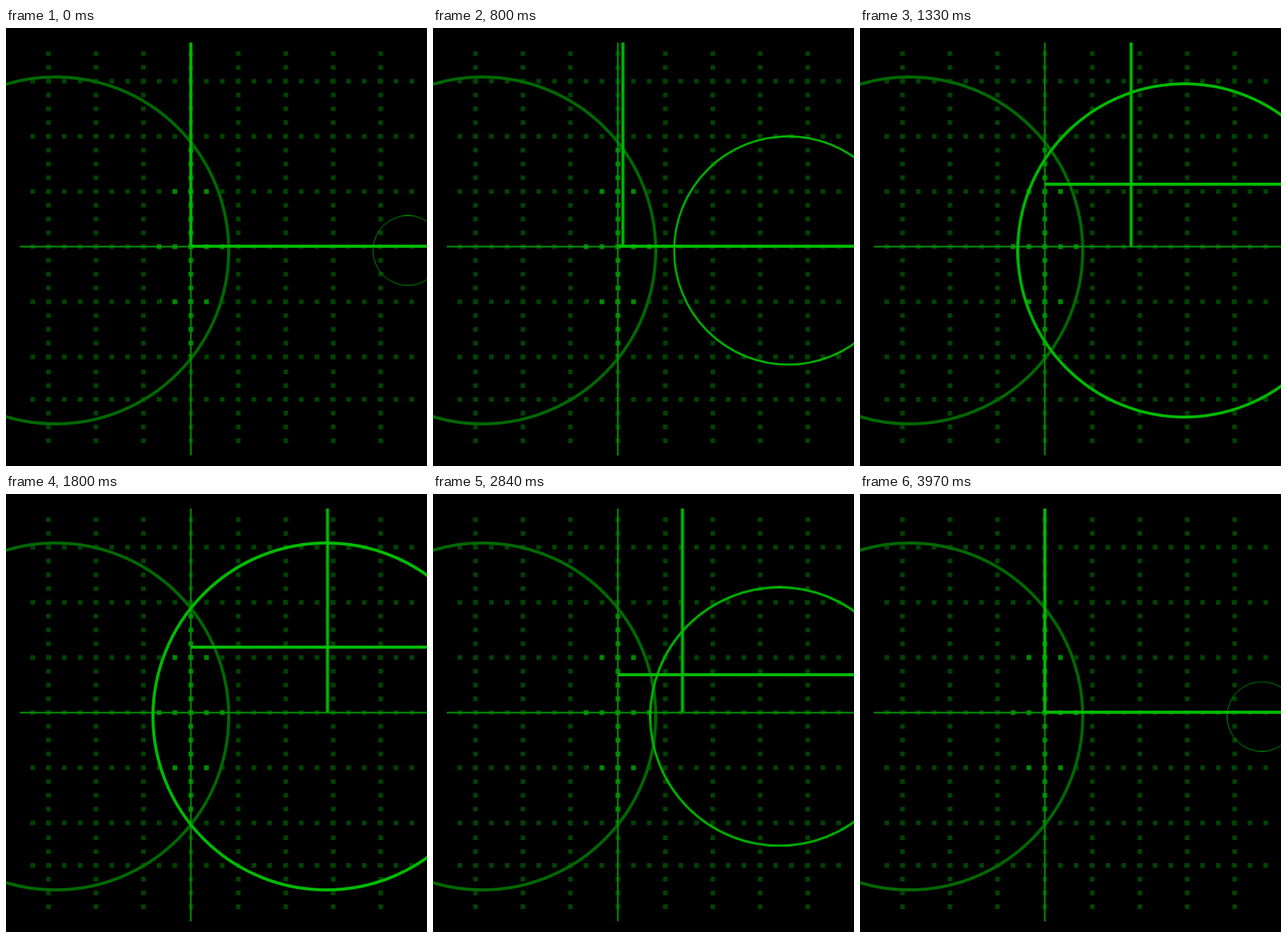
Animation of 550 by 572 pixels, one loop 4000 ms. Source, as an HTML page without scripts:

```html
<!DOCTYPE html>
<html lang="en">
<head>
<meta charset="utf-8">
<title>Grid and circles</title>
<style>
  html, body { margin: 0; width: 100%; height: 100%; overflow: hidden; background: #000; }
  svg { display: block; width: 550px; height: 572px; }
  path, circle { fill: none; }
  .dots { stroke: #004300; }
  .lit { stroke: #008a00; }
  .dots path, .lit path { stroke-width: 6; }
  .rows { stroke-dasharray: 6 14.625; }
  .cols { stroke-dasharray: 6 12; }
  .axes { stroke: #009800; stroke-width: 2; }
  .still { stroke: #006800; stroke-width: 4; }
  .moving { stroke: #00ba00; stroke-width: 4; }
  .moving > * { animation: 4s linear infinite; }
  .moving .disc { animation-name: grow; transform-origin: 551.8px 290.5px; }
  .moving .up { animation-name: slide; }
  .moving .across { animation-name: lift; }

  @keyframes grow {
    0%, 79.6%, 100% { transform: scale(.201); }
    35%, 67% { transform: scale(1); }
  }
  @keyframes slide {
    0%, 19.2%, 79.6%, 100% { transform: translateX(0); }
    43% { transform: translateX(190.5px); }
    54.25%, 67% { transform: translateX(124px); }
  }
  @keyframes lift {
    0%, 21.5%, 79.6%, 100% { transform: translateY(0); }
    35.7% { transform: translateY(-98px); }
    53.5%, 67% { transform: translateY(-72.5px); }
  }
</style>
</head>
<body>
<svg viewBox="0 0 550 572">
  <defs>
    <clipPath id="left"><circle cx="64.5" cy="290.5" r="226.5"/></clipPath>
    <clipPath id="lens" clip-path="url(#left)"><circle cx="418.5" cy="290.5" r="226.5"/></clipPath>
    <path id="row" class="rows" d="M32 0H534"/>
    <path id="col" class="cols" d="M0 30.5V433M0 446V542"/>
    <g id="grid">
      <use href="#row" y="69.5"/>
      <use href="#row" y="141.5"/>
      <use href="#row" y="213.5"/>
      <use href="#row" y="285.5"/>
      <use href="#row" y="357.5"/>
      <use href="#row" y="429.5"/>
      <use href="#row" y="485"/>
      <use href="#col" x="55.5"/>
      <use href="#col" x="117.5"/>
      <use href="#col" x="179.5"/>
      <use href="#col" x="241.5"/>
      <use href="#col" x="303.5"/>
      <use href="#col" x="365.5"/>
      <use href="#col" x="427.5"/>
      <use href="#col" x="489.5"/>
    </g>
  </defs>

  <g stroke-width="6">
    <use href="#grid" class="dots"/>
    <g clip-path="url(#lens)"><use href="#grid" class="lit"/></g>
  </g>

  <circle class="still" cx="64.5" cy="290.5" r="226.5"/>
  <path class="axes" d="M18 285.5H550M241.5 19V558"/>

  <g class="moving">
    <circle class="disc" cx="418.5" cy="290.5" r="226.5"/>
    <path class="up" d="M241.5 19V285"/>
    <path class="across" d="M241.5 285H550"/>
  </g>
</svg>
</body>
</html>
```
